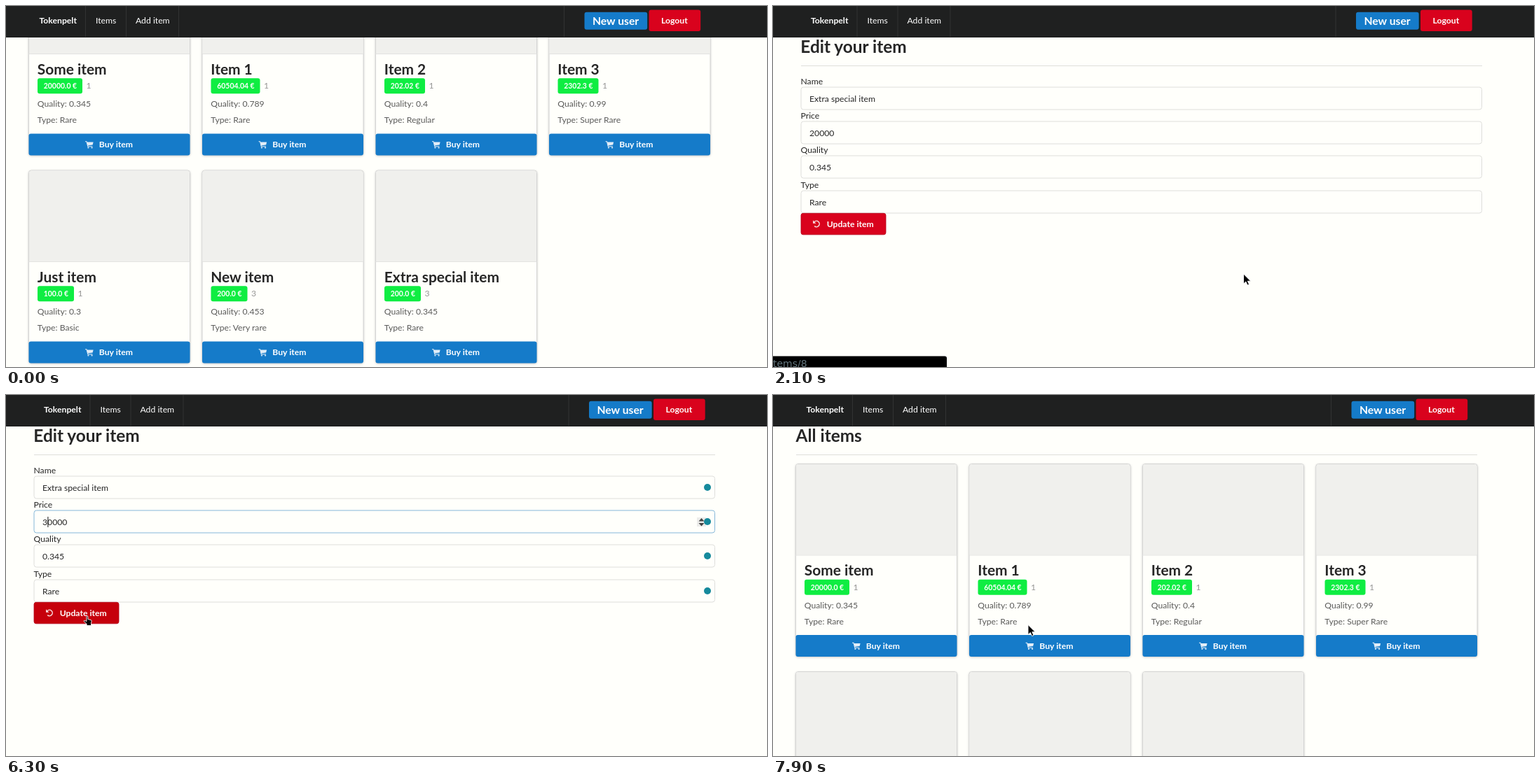
Write an HTML page that moves like this. It is 1086x516 px and loops after 8000 ms.

```html
<!DOCTYPE html>
<html lang="en">
<head>
<meta charset="utf-8">
<title>Item shop</title>
<style>
  html, body { margin: 0; width: 100%; height: 100%; overflow: hidden; background: #fffffb; }
  svg { display: block; width: 1086px; height: 516px; font: 12.2px Lato, sans-serif; fill: #262626; }
  .bold { font-weight: 700; }
  .h1 { font-size: 24.4px; font-weight: 700; }
  .h2 { font-size: 20.9px; font-weight: 700; }
  .tag { font-size: 10.4px; font-weight: 700; }
  .big { font-size: 15.7px; font-weight: 700; }
  .soft { fill: #5b5b5a; }
  .pale { fill: #979796; }
  .white { fill: #fff; }
  .url { font: 14px "DejaVu Sans", sans-serif; fill: #62757d; }
  .card { filter: drop-shadow(0 1px 1.5px #c8c8c8); }
</style>
</head>
<body>
<svg id="stage" viewBox="0 0 1086 516"></svg>
<script>
const BLUE = '#157bc9', RED = '#d9021d', DARK_RED = '#c6000c', GREEN = '#0fed42',
      LINE = '#dededb', TEAL = '#168a9c', PAGE = '#fffffb';

const stage = document.getElementById('stage');

function add(parent, tag, attrs, text) {
  const el = document.createElementNS('http://www.w3.org/2000/svg', tag);
  for (const key in attrs) el.setAttribute(key, attrs[key]);
  if (text !== undefined) el.textContent = text;
  return parent.appendChild(el);
}
const group = (parent, x = 0, y = 0) => add(parent, 'g', { transform: `translate(${x} ${y})` });
const label = (parent, x, y, text, cls = '') => add(parent, 'text', { x, y, class: cls }, text);
const box = (parent, x, y, width, height, fill, rx = 0, more = {}) =>
  add(parent, 'rect', { x, y, width, height, fill, rx, ...more });
const path = (parent, d, more) => add(parent, 'path', { d, ...more });
const show = (el, on) => el.setAttribute('opacity', +on);
const move = (el, x, y) => el.setAttribute('transform', `translate(${x} ${y})`);

// Item list
const list = group(stage);
label(list, 32.5, 67, 'All items', 'h1');
box(list, 33, 85, 972, 1, LINE);

function addCard(index, [name, price, count, quality, type]) {
  const card = group(list, 32.5 + 247.5 * (index % 4), 98.5 + 297 * Math.floor(index / 4));
  box(card, 0, 0, 230, 275, PAGE, 3.5, { class: 'card', stroke: '#d4d4d3' });
  path(card, 'M.5 130V4q0-3.5 3.5-3.5h222q3.5 0 3.5 3.5V130z', { fill: '#f0f0ed' });
  box(card, 0, 130, 230, 1, '#e3e3e1');
  const title = label(card, 12.3, 159.6, name, 'h2');
  const width = 28 + 6 * price.replace('.', '').length;
  box(card, 12.5, 165.3, width, 22, GREEN, 3);
  label(card, 21.3, 180, price + ' €', 'tag white');
  label(card, width + 18, 180, count, 'pale');
  label(card, 12.3, 206.2, 'Quality: ' + quality, 'soft');
  label(card, 12.3, 229.2, 'Type: ' + type, 'soft');
  path(card, 'M0 247.5q0-3 3-3h224q3 0 3 3v25q0 3-3 3h-224q-3 0-3-3z', { fill: BLUE });
  const cart = group(card, 80.5, 255);
  path(cart, 'M0 .7h2l1.8 7h6.6', { fill: 'none', stroke: '#e3eef8', 'stroke-width': 1.1 });
  path(cart, 'M2.4 1.6h9.2l-1 4-7.2.9z', { fill: '#e3eef8' });
  for (const cx of [4.4, 9.6]) add(cart, 'circle', { cx, cy: 9.5, r: 1.1, fill: '#e3eef8' });
  label(card, 100.3, 264.3, 'Buy item', 'bold white');
  return title;
}
const titles = [
  ['Some item', '20000.0', 1, '0.345', 'Rare'],
  ['Item 1', '60504.04', 1, '0.789', 'Rare'],
  ['Item 2', '202.02', 1, '0.4', 'Regular'],
  ['Item 3', '2302.3', 1, '0.99', 'Super Rare'],
  ['Just item', '100.0', 1, '0.3', 'Basic'],
  ['New item', '200.0', 3, '0.453', 'Very rare'],
  ['Extra special item', '200.0', 3, '0.345', 'Rare']
].map((item, i) => addCard(i, item));

// Edit form
const form = group(stage);
label(form, 39.3, 67, 'Edit your item', 'h1');
box(form, 40, 85, 972, 1, LINE);

const fields = [['Name', 'Extra special item'], ['Price', '20000'], ['Quality', '0.345'], ['Type', 'Rare']]
  .map(([name, value], i) => {
    const row = group(form, 0, Math.round(49.2 * i));
    label(row, 39.5, 112, name);
    const frame = box(row, 40, 116, 971.5, 32, PAGE, 3.5, { stroke: LINE });
    return { row, frame, text: label(row, 52, 137, value) };
  });
const price = fields[1];
const spinner = group(price.row);
box(spinner, 986, 126, 13, 13, '#ececea');
path(spinner, 'M988.5 131.4h8l-4-4.4zM988.5 134h8l-4 4.4z', { fill: '#444' });
const badges = fields.map(f => add(f.row, 'circle', { cx: 1001, cy: 132, r: 5, fill: TEAL }));
const caret = box(price.row, 52.5, 125, 1, 15, '#111');

const update = box(form, 40, 296.3, 121, 30.5, RED, 3, { stroke: '#b3001a', 'stroke-width': .8 });
path(form, 'M59 308.6a4.2 4.2 0 1 1 .2 6', { fill: 'none', stroke: '#f8dce0', 'stroke-width': 1.5 });
path(form, 'M57 306.3v4.4h4.4z', { fill: '#f8dce0' });
label(form, 76.7, 316, 'Update item', 'bold white');

// Navigation bar
box(stage, 0, 0, 1086, 45, '#1f2020');
const nav = group(stage);
for (const x of [113, 171, 246, 796]) box(nav, x, 0, 1, 44, '#323333');
label(nav, 47.5, 25, 'Tokenpelt', 'bold white');
label(nav, 128, 25, 'Items', 'white');
label(nav, 185, 25, 'Add item', 'white');
box(nav, 825.5, 8.7, 89.7, 25, BLUE, 3);
label(nav, 837, 26.6, 'New user', 'big white');
box(nav, 917.5, 5.5, 73.7, 30.5, RED, 3);
label(nav, 935, 25, 'Logout', 'bold white');

// Browser status line
const status = group(stage);
path(status, 'M0 500.5h245q3 0 3 3V516H0z', { fill: '#000' });
const url = label(status, 0, 516, 'tems/8', 'url');

// Pointers
const outline = { fill: '#000', stroke: '#fff', 'stroke-width': .9 };
const pointer = group(stage);
const shapes = {
  arrow: path(pointer, 'M0 0V14L3.3 11 5.6 16 8 15 5.8 10.2H10.2z', outline),
  beam: path(pointer, 'M-3-7.2h2l1 .7 1-.7h2M0-6.5v13M-3 7.2h2l1-.7 1 .7h2',
    { fill: 'none', stroke: '#111', 'stroke-width': 1.3 }),
  hand: path(pointer, 'M-1 0q1-1.6 2 0v4l4.2 1q1.2.3 1 1.6l-.6 3.2v3.2h-6.4v-2.2l-3.8-3.6q-.6-1.8 1.2-1.4l2.4 1.2z', outline)
};

// Pointer route: time, x, y
const route = [
  [300, 563, 498], [400, 882, 414], [500, 882, 414], [600, 900, 425], [900, 830, 478],
  [1100, 750, 470], [1300, 692, 400], [1400, 684, 386], [1500, 680, 385], [1700, 671.5, 383],
  [2300, 671.5, 383], [2700, 420, 255], [3000, 252, 178], [3100, 240.5, 172],
  [5600, 240.5, 172], [5800, 196, 212], [6000, 130, 292], [6100, 116, 316.5],
  [7700, 115.5, 317], [7900, 364, 328.5]
];

function locate(t) {
  const i = route.findIndex(p => p[0] > t);
  if (i < 0) return route[route.length - 1].slice(1);
  if (i === 0) return null;
  const [t0, x0, y0] = route[i - 1], [t1, x1, y1] = route[i];
  const k = (t - t0) / (t1 - t0);
  return [x0 + (x1 - x0) * k, y0 + (y1 - y0) * k];
}

function render(ms) {
  const t = Math.floor(ms % 8000 / 100) * 100;
  const within = (from, to) => t >= from && t < to;
  const editing = within(2100, 7300);

  show(list, !editing);
  show(form, editing);
  move(list, 0, t < 2100 ? -160.5 : 0);
  move(nav, editing ? 6.5 : 0, 0);
  titles[6].style.fill = within(1300, 2100) ? '#2566b0' : '';

  show(status, within(1600, 2400) || within(6900, 7500));
  show(url, t < 2400);

  const focused = within(3200, 6500);
  price.frame.setAttribute('stroke', focused ? '#85b7d9' : LINE);
  price.text.textContent = t < 4900 ? '20000' : t < 5100 ? '0000' : '30000';
  show(spinner, within(3000, 6500));
  badges.forEach(b => show(b, t >= 2400));
  caret.setAttribute('x', within(4700, 4900) || t >= 5100 ? 59.4 : 52.5);
  show(caret, within(3100, 6400) && !within(3700, 4300) && !within(5700, 6100));
  update.setAttribute('fill', t >= 6100 ? DARK_RED : RED);

  const at = locate(t);
  show(pointer, at !== null);
  if (!at) return;
  const [x, y] = at;
  move(pointer, x, y);
  let kind = 'arrow';
  if (editing && y > 296 && y < 327 && x < 161) kind = 'hand';
  else if (editing && y > 116 && y < 296 && (y - 116) % 49.2 < 32) kind = 'beam';
  for (const name in shapes) show(shapes[name], name === kind);
}

const start = performance.now();
function tick() {
  render(performance.now() - start);
  requestAnimationFrame(tick);
}
tick();
</script>
</body>
</html>
```
